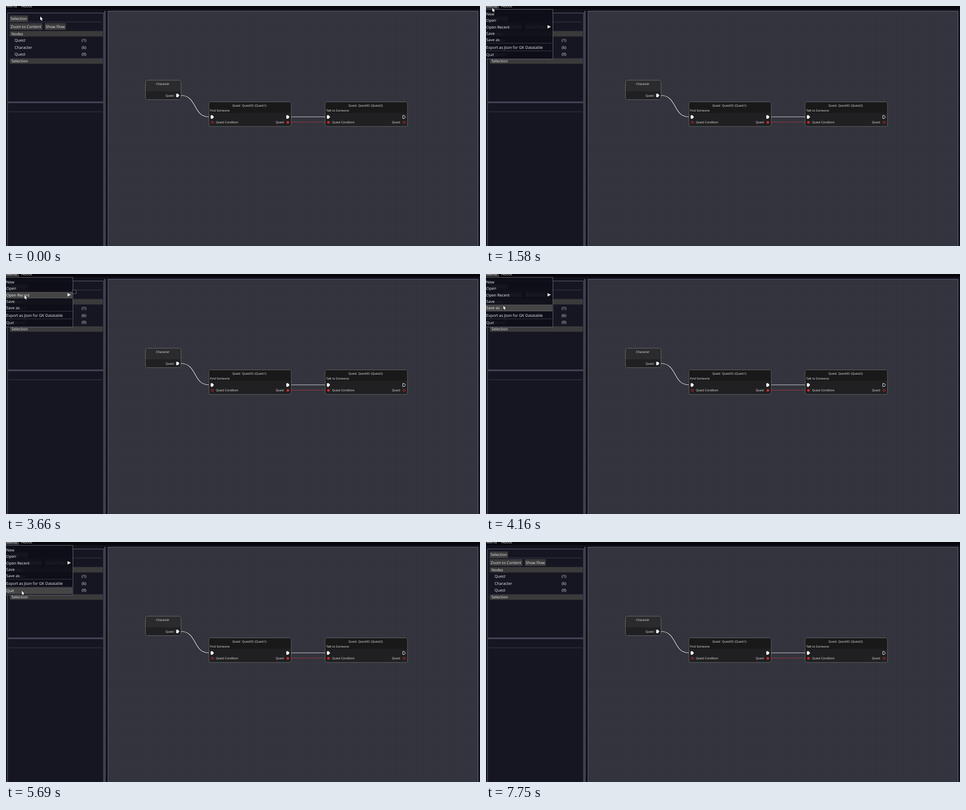
These frames come from a looping animation (1052x532 px, 8.62 s). An HTML page with a canvas:

```html
<!DOCTYPE html>
<html lang="en">
<head>
<meta charset="utf-8">
<title>Quest node editor</title>
<style>
html, body { margin: 0; width: 100%; height: 100%; overflow: hidden; background: #10101a; }
canvas { display: block; width: 1052px; height: 532px; }
</style>
</head>
<body>
<canvas id="stage" width="1052" height="532"></canvas>
<script>
const W = 1052, H = 532, LOOP = 8620, STEP = 30;
const MENU_OPEN = 1580, MENU_CLOSE = 7360;
const MENU = { width: 149, top: 7, bottom: 117 };
const FONT = '"Open Sans", "Noto Sans", sans-serif';
const UI = 8.65, NODE = 6.55;
const BORDER = '#696a7c', RULE = '#3d3d4b', BAR = '#3a3a3b', RED = '#e02a2a';

const stage = document.getElementById('stage').getContext('2d');
let c = stage;

// Each move: when it begins, how long it lasts, where the pointer stops
const home = { x: 76, y: 23 };
const moves = [
  { at: 0, ms: 230, x: 516, y: 67 },
  { at: 230, ms: 600, x: 36, y: 11 },
  { at: 920, ms: 270, x: 14, y: 4 },
  { at: 2100, ms: 390, x: 31, y: 19 },
  { at: 2670, ms: 120, x: 34, y: 32 },
  { at: 2970, ms: 180, x: 39, y: 42 },
  { at: 3300, ms: 60, x: 41, y: 43.5 },
  { at: 3630, ms: 210, x: 41, y: 56 },
  { at: 3950, ms: 330, x: 38, y: 73 },
  { at: 4430, ms: 190, x: 37, y: 93.5 },
  { at: 4870, ms: 180, x: 35, y: 108 },
  { at: 5940, ms: 630, x: 345, y: 313.5 },
  { at: 7540, ms: 210, x: 1030, y: 545 }
];

const easeOut = k => 1 - (1 - k) ** 2;

function pointerAt(time) {
  const t = Math.floor(time / STEP) * STEP;
  let { x, y } = home;
  for (const m of moves) {
    if (t < m.at) break;
    const k = easeOut(Math.min(1, (t - m.at) / m.ms));
    x += (m.x - x) * k;
    y += (m.y - y) * k;
  }
  return { x, y };
}

// Menu rows share one pitch; a separator, written as '-', adds a small gap
const ROW = 14.3, GAP = 2.1;
const rows = [], separators = [];
let rowY = 18;
for (const label of ['New', 'Open', 'Open Recent', 'Save', 'Save as', '-',
  'Export as Json for GK Datatable', '-', 'Quit']) {
  if (label === '-') {
    separators.push(Math.round(rowY - ROW / 2));
    rowY += GAP;
  } else {
    rows.push({ label, y: rowY });
    rowY += ROW;
  }
}

function rect(x, y, w, h, fill) {
  c.fillStyle = fill;
  c.fillRect(x, y, w, h);
}

function frame(x, y, w, h, color = BORDER) {
  c.strokeStyle = color;
  c.lineWidth = 1;
  c.strokeRect(x + 0.5, y + 0.5, w - 1, h - 1);
}

function rounded(x, y, w, h, r, fill) {
  c.beginPath();
  c.roundRect(x, y, w, h, r);
  c.fillStyle = fill;
  c.fill();
}

function polygon(points) {
  c.beginPath();
  points.forEach(([x, y]) => c.lineTo(x, y));
  c.closePath();
}

function line(color, width, draw) {
  c.beginPath();
  draw();
  c.strokeStyle = color;
  c.lineWidth = width;
  c.stroke();
}

function text(str, x, cy, size = UI) {
  c.font = size + 'px ' + FONT;
  c.textRendering = 'geometricPrecision';
  c.fillStyle = '#f0f0f2';
  c.fillText(str, x, cy + size * 0.36);
}

function button(label, x, y, w, h) {
  rounded(x, y, w, h, 2, BAR);
  text(label, x + 2, y + h / 2);
}

function header(label, cy) {
  rounded(8, cy - 6, 207, 12, [3, 0, 0, 3], BAR);
  text(label, 12, cy);
}

function panel(y, h) {
  rect(3, y, 214, h, '#161623');
  frame(3, y, 214, h);
}

function sidebar() {
  panel(15, 198);
  panel(214, H);
  rect(218, 11, 3, H, '#4b4b59');

  button('Selection', 8, 21, 41, 14);
  rect(6, 35, 208, 1, RULE);
  button('Zoom to Content', 8, 38, 73, 15);
  button('Show Flow', 86, 38, 47, 15);

  header('Nodes', 61.5);
  [['Quest', 1], ['Character', 6], ['Quest', 9]].forEach(([name, n], i) => {
    const y = 76 + i * 15.4;
    text(name, 19, y);
    text('(' + n + ')', 168, y);
  });
  header('Selection', 122);
  rect(6, 234, 208, 1, RULE);
}

function board() {
  rect(226, 11, 822, H, '#33343d');
  c.fillStyle = 'rgba(20, 22, 28, 0.05)';
  for (let x = 229; x < 1047; x += 12) c.fillRect(x, 12, 1, H);
  for (let y = 21; y < H; y += 12) c.fillRect(227, y, 820, 1);
  frame(226, 11, 822, H);
}

function flowPin(x, y, filled = true) {
  polygon([[x - 2.8, y - 3.3], [x + 0.6, y - 3.3], [x + 3.2, y], [x + 0.6, y + 3.3], [x - 2.8, y + 3.3]]);
  c.fillStyle = c.strokeStyle = '#fff';
  c.lineWidth = 1;
  c.lineJoin = 'round';
  if (filled) c.fill();
  c.stroke();
}

function dataPin(x, y, filled) {
  c.beginPath();
  c.arc(x, y, 2.3, 0, Math.PI * 2);
  c.fillStyle = c.strokeStyle = RED;
  c.lineWidth = 1;
  if (filled) c.fill();
  c.stroke();
  polygon([[x + 3.1, y - 1.1], [x + 4.4, y], [x + 3.1, y + 1.1]]);
  c.fill();
}

function nodeBox(x, y, w, h, head, headFill) {
  rounded(x, y, w, h, 4, '#202022');
  rounded(x, y, w, head, [4, 4, 0, 0], headFill);
  c.beginPath();
  c.roundRect(x + 0.5, y + 0.5, w - 1, h - 1, 4);
  c.strokeStyle = '#6c6c70';
  c.lineWidth = 1;
  c.stroke();
}

function questNode(x, id, task, last) {
  const left = x + 8, right = x + 175.8, flowY = 246, dataY = 258;
  nodeBox(x, 212, 184, 55.5, 25, '#19191a');
  text('Quest\u00a0 QuestID: (' + id + ')', x + 52.5, 220.5, NODE);
  text(task, x + 3, 232, NODE);
  flowPin(left, flowY);
  flowPin(right, flowY, !last);
  dataPin(left, dataY, last);
  dataPin(right, dataY, !last);
  text('Quest Condition', x + 16.2, dataY, NODE);
  text('Quest', x + 149, dataY, NODE);
}

function characterNode(x, y) {
  nodeBox(x, y, 80, 44, 25, '#2b2b2d');
  text('Character', x + 24, y + 9, NODE);
  text('Quest', x + 45.3, y + 34.5, NODE);
  flowPin(x + 72, y + 34.3);
}

function graph() {
  characterNode(309, 164);
  questNode(449.7, 'Quest1', 'Find Someone', false);
  questNode(707.6, 'Quest2', 'Talk to Someone', true);
  line('#e6e6e8', 1.1, () => {
    c.moveTo(388.5, 198.3);
    c.bezierCurveTo(424, 198.3, 415, 245.7, 450, 245.7);
  });
  line('#e0e0e2', 1.1, () => { c.moveTo(633.5, 245.7); c.lineTo(708, 245.7); });
  line('#a8363c', 1, () => { c.moveTo(633.5, 257.6); c.lineTo(708, 257.6); });
}

function menuBar(active) {
  rect(0, 0, W, 7, '#08080c');
  if (active) rect(0, 0, 29, 6, BAR);
  text('Menu', 1, 0);
  text('About', 34, 0);
}

function highlight(cy) {
  rect(0, cy - 7, 147, 14, '#5a5a5b');
  rect(0, cy - 6, 146, 12, '#454546');
}

function submenu(cy) {
  const y = Math.round(cy - 11.5);
  rect(147, y, 9, 9, '#10101a');
  frame(147, y, 9, 9);
}

function menu(tip) {
  const { width, top, bottom } = MENU;
  rect(0, top, width, bottom - top, 'rgba(14, 14, 24, 0.9)');
  frame(-2, top, width + 2, bottom - top + 1);
  separators.forEach(y => rect(0, y, 147, 1, RULE));

  const inside = tip.x < width && tip.y < bottom;
  const active = inside ? rows.findLast(r => tip.y >= r.y - ROW / 2) : null;
  if (active) highlight(Math.round(active.y));
  rows.forEach(r => text(r.label, 0.5, r.y));

  const recent = rows[2];
  polygon([[136.5, recent.y - 4.3], [144, recent.y - 0.5], [136.5, recent.y + 3.3]]);
  c.fillStyle = '#e8e8e8';
  c.fill();
  if (active === recent) submenu(recent.y);
}

function pointer({ x, y }) {
  c.save();
  c.translate(x, y);
  polygon([[0, 0], [0, 8.6], [1.9, 6.9], [3.3, 10.1], [4.7, 9.5], [3.4, 6.4], [6, 6.2]]);
  c.lineJoin = 'round';
  c.strokeStyle = '#000';
  c.lineWidth = 1.2;
  c.stroke();
  c.fillStyle = '#fff';
  c.fill();
  c.restore();
}

// The scene under the menu never changes, so it is painted once
const scene = document.createElement('canvas');
scene.width = W;
scene.height = H;
c = scene.getContext('2d');
rect(0, 0, W, H, '#12121d');
sidebar();
board();
graph();
c = stage;

function render(now) {
  const t = now % LOOP;
  const tip = pointerAt(t);
  const open = t >= MENU_OPEN && t < MENU_CLOSE;
  const hover = tip.y < 6 && tip.x < 29;
  c.drawImage(scene, 0, 0);
  menuBar(open || hover);
  if (open) menu(tip);
  pointer(tip);
}

const start = performance.now();
function tick() {
  render(performance.now() - start);
  requestAnimationFrame(tick);
}
tick();
</script>
</body>
</html>
```
